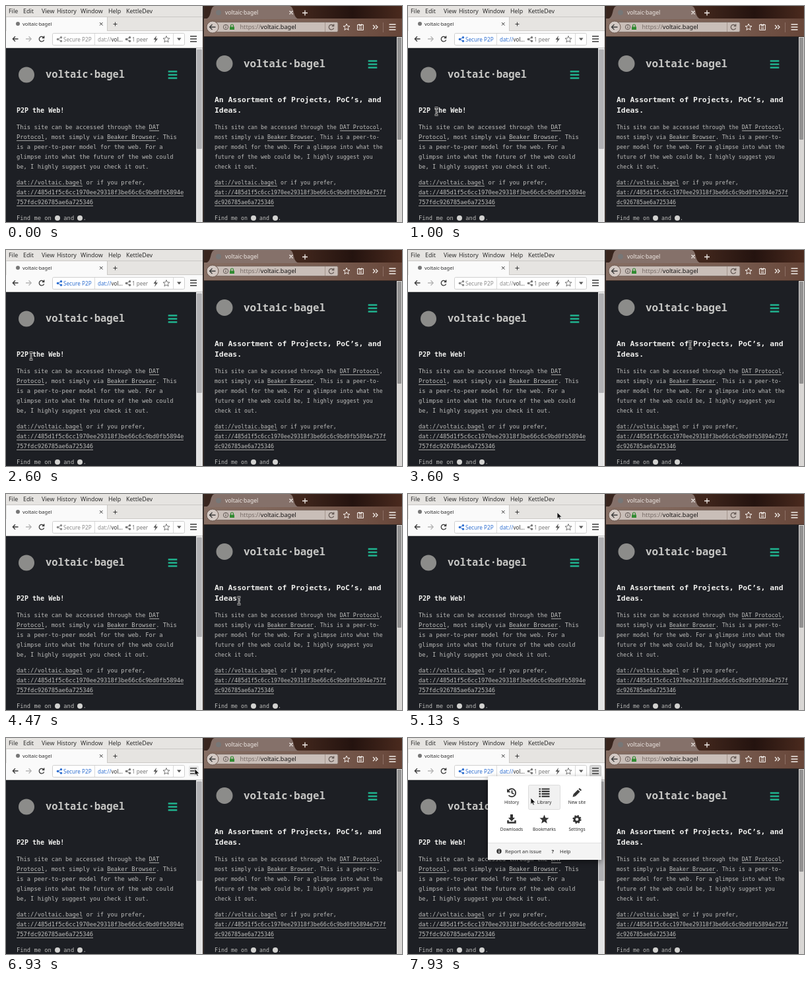
An HTML page that plays this animation: 600 by 328 pixels, repeating every 8 s.

```html
<!DOCTYPE html>
<html lang="en">
<head>
<meta charset="utf-8">
<title>Two browsers</title>
<style>
html, body { margin: 0; width: 600px; height: 328px; overflow: hidden; background: #1d1f24; }
svg { position: absolute; left: 0; top: 0; width: 600px; height: 328px; }
svg text { font-family: "Noto Sans", "Open Sans", sans-serif; fill: #2b2b2b; }
.line { fill: none; stroke: #3a3a3a; stroke-width: 1.3; }
.white { fill: none; stroke: #f4eeea; stroke-width: 1.3; }

.page { position: absolute; top: 0; color: #bdbdbb; font: 8.77px/15px "DejaVu Sans Mono", monospace; white-space: pre; }
.page > * { position: absolute; left: 0; margin: 0; }
.page h1 { color: #c6c6c4; font: 600 15.4px/20px "Noto Sans Mono", "DejaVu Sans Mono", monospace; }
.page h2 { color: #f0f0ee; font: bold 10px/16px "DejaVu Sans Mono", monospace; }
.page u { text-decoration: none; border-bottom: 1px solid #a5a5a3; }
.page i { display: inline-block; width: 8px; height: 8px; border-radius: 50%; background: #d2d2d0; vertical-align: -1px; }
.intro { top: 176.5px; }
.links { top: 260.5px; }
.find { top: 314.5px; }
#left { left: 16px; }
#left h1 { left: 44px; top: 94px; }
#left h2 { top: 151px; }
#right { left: 316px; font-size: 8.3px; }
#right h1 { left: 44px; top: 76.5px; font-size: 15.9px; }
#right h2 { top: 133.5px; font-size: 11.35px; }

.secure, #menu, #hover, #press, #beam, #arrow { animation: 8s step-end infinite; }
.secure { animation-name: focus; fill: #8a8a8a; color: #8a8a8a; }
.secure text { fill: currentColor; }
#hover { animation-name: hover; }
#press, #menu { animation-name: open; }
#menu { filter: drop-shadow(0 3px 4px #0007); }
#beam { animation-name: beam; }
#arrow { animation-name: arrow; }
#cursor { animation: move 8s ease-in-out infinite; }

@keyframes focus {
  0%, 43% { fill: #8a8a8a; color: #8a8a8a; }
  8%, 64% { fill: #2f6fd0; color: #2f6fd0; }
  100% { fill: #2f6fd0; color: #2f6fd0; }
}
@keyframes hover { 0% { opacity: 0; } 84%, 100% { opacity: 1; } }
@keyframes open { 0% { opacity: 0; } 90%, 100% { opacity: 1; } }
@keyframes beam { 0%, 60%, 100% { opacity: 0; } 7% { opacity: 1; } }
@keyframes arrow { 0%, 7% { opacity: 0; } 2.5%, 60%, 100% { opacity: 1; } }
@keyframes move {
  0%, 2.5% { transform: translate(190px, 326px); }
  8% { transform: translate(62px, 166px); }
  12.5% { transform: translate(43px, 160px); }
  17.5% { transform: translate(84px, 162px); }
  22.5% { transform: translate(22px, 161px); }
  27.5% { transform: translate(80px, 160px); }
  32.5%, 34.1% { transform: translate(38px, 161px); }
  41% { transform: translate(330px, 146px); }
  46% { transform: translate(436px, 144px); }
  51% { transform: translate(322px, 160px); }
  55.9% { transform: translate(353px, 162px); }
  64% { transform: translate(226px, 28px); }
  74.1%, 76% { transform: translate(275px, 27px); }
  84%, 90% { transform: translate(286px, 47px); }
  99.1%, 100% { transform: translate(186px, 91px); }
}
</style>
</head>
<body>
<svg viewBox="0 0 600 328">
  <defs>
    <linearGradient id="strip">
      <stop offset="0" stop-color="#38251e"/><stop offset=".5" stop-color="#40261c"/>
      <stop offset=".75" stop-color="#24130f"/><stop offset="1" stop-color="#4a2a1e"/>
    </linearGradient>
    <linearGradient id="bar">
      <stop offset="0" stop-color="#866e63"/><stop offset=".6" stop-color="#795d51"/><stop offset="1" stop-color="#674639"/>
    </linearGradient>
    <path id="star" d="M0-5 1.4-1.6 5-1.4 2.2.9 3.1 4.5 0 2.5-3.1 4.5-2.2.9-5-1.4-1.4-1.6Z"/>
    <path id="burger" d="M-5-4H5M-5 0H5M-5 4H5"/>
    <path id="nav" d="M-6.8-5H6.8M-6.8 0H6.8M-6.8 5H6.8" stroke="#20b38e" stroke-width="2.6"/>
    <path id="reload" d="M3.2-2A3.8 3.8 0 1 0 3.6 1.5M3.7-4.5V-1.5H.8"/>
    <g id="share">
      <circle cx="-2.6" r="1.7"/><circle cx="2.5" cy="-2.7" r="1.7"/><circle cx="2.5" cy="2.7" r="1.7"/>
      <path d="M2.5-2.7-2.6 0 2.5 2.7" fill="none" stroke="currentColor"/>
    </g>
  </defs>

  <!-- left window -->
  <path d="M0 0H298V38H0Z" fill="#e6e4e1"/>
  <g font-size="8.9">
    <text x="4" y="11">File</text><text x="26" y="11">Edit</text><text x="54" y="11">View</text>
    <text x="77" y="11">History</text><text x="113" y="11">Window</text><text x="155" y="11">Help</text>
    <text x="182" y="11">KettleDev</text>
  </g>
  <path d="M0 16.5H298M153.5 17V38M153 37.5H298" stroke="#cbc9c6"/>
  <path d="M1 17H153V38H1Z" fill="#fafafa"/>
  <circle cx="18" cy="27" r="3" fill="#777"/>
  <text x="25" y="30" font-size="7.5">voltaic·bagel</text>
  <path d="M142 25 146.500 29.500M146.500 25 142 29.500M162.500 27.500H168.500M165.500 24.500V30.500" class="line" style="stroke-width:1"/>
  <path d="M0 38H298V64H0Z" fill="#fafafa"/>
  <path d="M0 63.500H298" stroke="#c9c9c9"/>
  <path d="M18.500 50H10.500M14 46.300 10.300 50 14 53.700" class="line"/>
  <path d="M30 50H38M34.500 46.300 38.200 50 34.500 53.700" class="line" style="stroke:#b5b5b5"/>
  <use href="#reload" x="54" y="50" class="line"/>
  <rect x="70.500" y="41.500" width="200" height="18" rx="2" fill="#fff" stroke="#cfcfcf"/>
  <path d="M134.500 42V59M253.500 42V59" stroke="#d9d9d9"/>
  <g class="secure">
    <use href="#share" x="81" y="50.500"/>
    <text x="87" y="53.500" font-size="8.200">Secure P2P</text>
    <text x="139" y="53.500" font-size="8">dat://</text>
  </g>
  <text x="159.500" y="53.500" font-size="8">vol...</text>
  <use href="#share" x="185" y="50.500" fill="#777" color="#777"/>
  <text x="191" y="53.500" font-size="8.100" style="fill:#777">1 peer</text>
  <path d="M228 45 223.500 51H226.500L225 56 230 49.500H227Z" fill="#555"/>
  <use href="#star" x="243" y="50.500" fill="none" stroke="#666" stroke-width=".9"/>
  <path d="M259 48.500H265.500L262.250 52.500Z" fill="#555"/>
  <rect id="hover" x="277" y="42" width="15" height="16" rx="2" fill="#e8e8e8"/>
  <rect id="press" x="275.500" y="41.500" width="17" height="17" rx="2" fill="#d8d8d8" stroke="#c4c4c4"/>
  <use href="#burger" x="284" y="50" class="line"/>
  <path d="M288 64H298V328H288Z" fill="#e3e3e3"/>
  <rect x="289" y="66" width="8" height="151" rx="1" fill="#b0b0b3"/>
  <path d="M298 0H300V328H298Z" fill="#38302d"/>
  <circle cx="31" cy="104.500" r="12" fill="#8c8c8a"/>
  <use href="#nav" x="252.500" y="104.500"/>

  <!-- right window -->
  <path d="M300 0H600V20H300Z" fill="url(#strip)"/>
  <path d="M300 19H600V47H300Z" fill="url(#bar)"/>
  <path d="M302 20Q308 19 310 10 312 0 316 0H430Q434 0 436 10 438 19 444 20Z" fill="#85716a"/>
  <circle cx="322" cy="10" r="4" fill="#777"/>
  <text x="332" y="13" font-size="8.500" style="fill:#efe8e4">voltaic·bagel</text>
  <path d="M429.500 7.500 434.500 12.500M434.500 7.500 429.500 12.500M449 10.500H457M453 6.500V14.500" class="white"/>
  <rect x="318" y="24.500" width="185" height="15" rx="2" fill="#c9beb8" stroke="#7b6a62"/>
  <circle cx="313" cy="32" r="9" fill="#d3c9c4" stroke="#6e5a51"/>
  <path d="M317.500 32H309M312.500 28 308.500 32 312.500 36" class="line"/>
  <circle cx="333" cy="32" r="3.700" fill="none" stroke="#5a514d" stroke-width=".9"/>
  <path d="M333 31V34M333 29.300V30.200" stroke="#5a514d"/>
  <path d="M340.500 32V30a2 2 0 0 1 4 0V32" fill="none" stroke="#328b32" stroke-width="1.200"/>
  <path d="M339 31.500H346V36H339Z" fill="#328b32"/>
  <text x="354.500" y="35" font-size="9.100" style="fill:#756a65">https://<tspan fill="#161414" style="fill:#161414">voltaic.bagel</tspan></text>
  <path d="M483.500 25V39" stroke="#a4958e"/>
  <use href="#reload" x="493" y="32" class="line" style="stroke:#685d58"/>
  <use href="#star" x="516" y="32" class="white" style="stroke-width:1"/>
  <path d="M532.500 28.500H541.500V36.500H532.500ZM535 27V29.500H539V27M534.500 32H539.500M534.500 34.500H539.500" class="white" style="stroke-width:1"/>
  <path d="M556 29 559 32 556 35M560 29 563 32 560 35" class="white"/>
  <path d="M571.500 25V40" stroke="#8b7064"/>
  <use href="#burger" x="585.500" y="32" class="white" style="stroke-width:1.600"/>
  <path d="M300 46.500H600" stroke="#3a2b25"/>
  <path d="M592 47H600V328H592Z" fill="#d9d7d5"/>
  <rect x="593" y="48" width="6" height="155" rx="1" fill="#929191"/>
  <circle cx="331" cy="87.500" r="12.500" fill="#8c8c8a"/>
  <use href="#nav" x="555.500" y="88.500"/>
</svg>

<div class="page" id="left">
<h1>voltaic·bagel</h1>
<h2>P2P the Web!</h2>
<p class="intro">This site can be accessed through the <u>DAT
Protocol</u>, most simply via <u>Beaker Browser</u>. This
is a peer-to-peer model for the web. For a
glimpse into what the future of the web could
be, I highly suggest you check it out.</p>
<p class="links"><u>dat://voltaic.bagel</u> or if you prefer,
<u>dat://485d1f5c6cc1970ee29318f3be66c6c9bd0fb5894e
757fdc926785ae6a725346</u></p>
<p class="find">Find me on <i></i> and <i></i>.</p>
</div>

<div class="page" id="right">
<h1>voltaic·bagel</h1>
<h2>An Assortment of Projects, PoC’s, and
Ideas.</h2>
<p class="intro">This site can be accessed through the <u>DAT Protocol</u>,
most simply via <u>Beaker Browser</u>. This is a peer-to-
peer model for the web. For a glimpse into what the
future of the web could be, I highly suggest you
check it out.</p>
<p class="links"><u>dat://voltaic.bagel</u> or if you prefer,
<u>dat://485d1f5c6cc1970ee29318f3be66c6c9bd0fb5894e757f
dc926785ae6a725346</u></p>
<p class="find">Find me on <i></i> and <i></i>.</p>
</div>

<svg viewBox="0 0 600 328">
  <g id="menu">
    <rect x="121" y="58" width="172" height="127" rx="2" fill="#fff"/>
    <path d="M121 160H293V185H121Z" fill="#f4f4f4"/>
    <path d="M121 159.500H293" stroke="#e0e0e0"/>
    <rect x="182.500" y="71.500" width="48" height="37" rx="2" fill="#f1f1f1" stroke="#dcdcdc"/>
    <g font-size="6.600" text-anchor="middle">
      <text x="157" y="100">History</text><text x="206.500" y="100">Library</text><text x="256" y="100">New site</text>
      <text x="157" y="140.500">Downloads</text><text x="206.500" y="140.500">Bookmarks</text><text x="256" y="140.500">Settings</text>
    </g>
    <g fill="none" stroke="#333" stroke-width="1.800">
      <path d="M152 80A6 6 0 1 1 152.500 87M157.500 79.500V83.500L160.500 85"/>
      <path d="M150 77V82.500H155.500Z" fill="#333" stroke="none"/>
      <path d="M198.500 77.500H201M202.500 77.500H214.500M198.500 81.200H201M202.500 81.200H214.500M198.500 84.900H201M202.500 84.900H214.500M198.500 88.600H201M202.500 88.600H214.500" stroke-width="2.200"/>
      <path d="M252 87 259 80M260 79 261.500 77.500" stroke-width="4.500"/>
      <path d="M249.500 89.500 250.500 85.500 253.500 88.500Z" fill="#333" stroke="none"/>
      <path d="M157 116V122" stroke-width="4"/>
      <path d="M152 121H162L157 126.500Z" fill="#333" stroke="none"/>
      <path d="M151.500 125V128.500H162.500V125" stroke-width="2.500"/>
      <circle cx="256" cy="123.500" r="3.800" stroke-width="3"/>
      <circle cx="256" cy="123.500" r="5.600" stroke-width="2" stroke-dasharray="2.200"/>
    </g>
    <use href="#star" transform="translate(206.500 123.500) scale(1.400)" fill="#333"/>
    <circle cx="138" cy="172" r="3.700" fill="#333"/>
    <path d="M138 171.300V174.500M138 169.300V170.400" stroke="#fff" stroke-width="1.200"/>
    <g font-size="7.600">
      <text x="147" y="175">Report an issue</text>
      <text x="217.500" y="175" font-weight="bold">?</text><text x="230" y="175">Help</text>
    </g>
  </g>
  <g id="cursor">
    <g id="beam" fill="none">
      <path d="M-2.500-5.500H2.500M0-5.500V5.500M-2.500 5.500H2.500" stroke="#e6e6e6" stroke-width="2.600"/>
      <path d="M-2.500-5.500H2.500M0-5.500V5.500M-2.500 5.500H2.500" stroke="#151515"/>
    </g>
    <path id="arrow" d="M0 0V9.500L2.200 7.600 3.700 11 5.300 10.300 3.900 7H7Z" fill="#111" stroke="#eee" stroke-width=".7"/>
  </g>
</svg>
</body>
</html>
```
